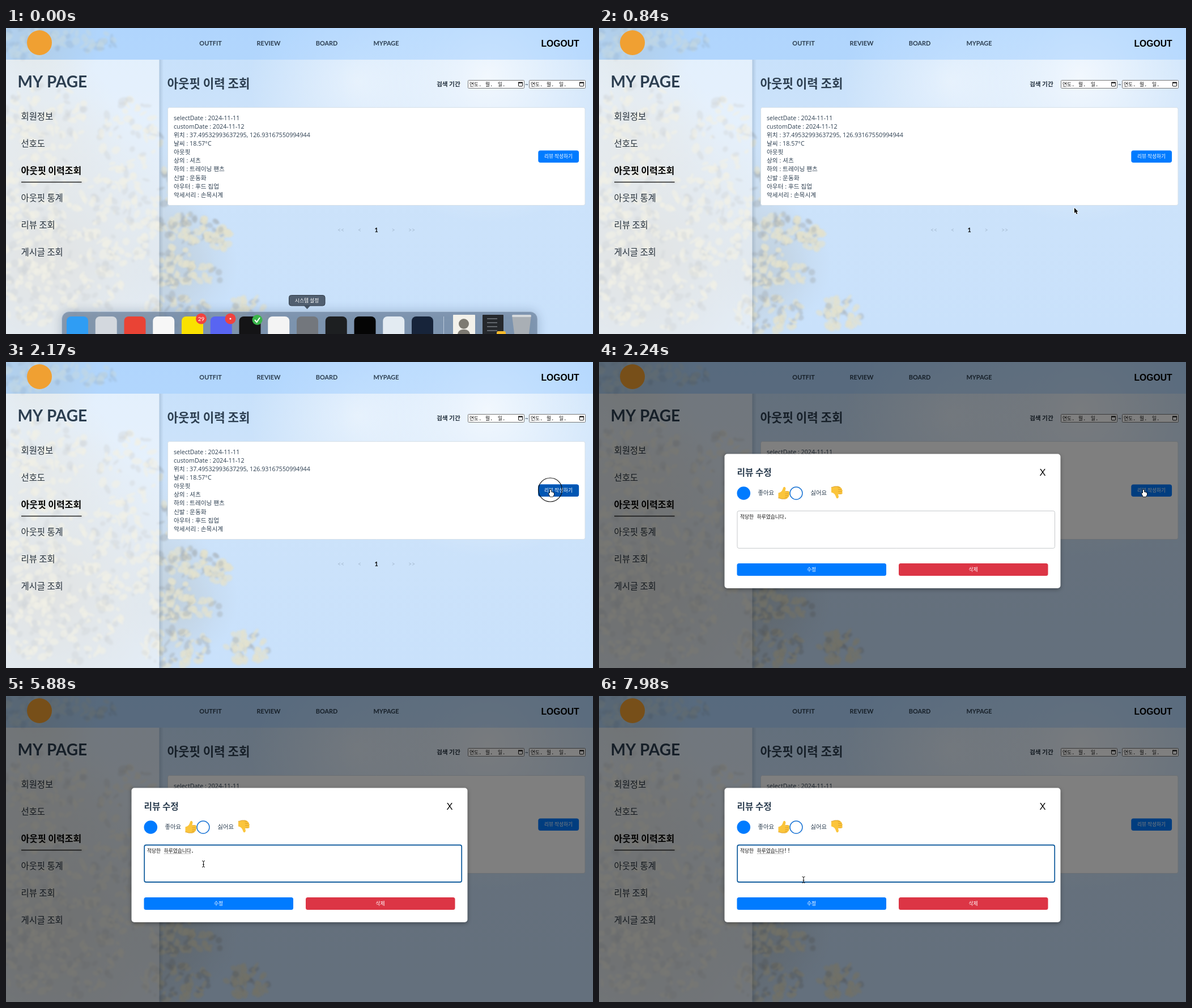
Write an HTML page with a canvas that moves like this. It is 1036 px wide and 541 px high and loops after 8 s.

```html
<!DOCTYPE html>
<html lang="ko">
<head>
<meta charset="utf-8">
<title>My page</title>
<style>
html, body { margin: 0; width: 100%; height: 100%; overflow: hidden; }
canvas { display: block; }
</style>
</head>
<body>
<canvas id="stage" width="1036" height="541"></canvas>
<script>
const W = 1036, H = 541, LOOP = 8000, STEP = 70;
const SANS = 'Lato, "Noto Sans CJK KR", "Noto Sans CJK", sans-serif';
const BODY = '"Open Sans", "Noto Sans CJK KR", "Noto Sans CJK", sans-serif';
const KOREAN = '"Noto Sans CJK KR", "Noto Sans CJK", sans-serif';
const MONO = '"DejaVu Sans Mono", monospace';
const ARIAL = '"Liberation Sans", sans-serif';
const INK = '#2c3e50', BLUE = '#007bff';

const screen = document.getElementById('stage').getContext('2d');
let ctx = screen;

function box(x, y, w, h, r, fill, stroke, line = 1) {
  ctx.beginPath();
  ctx.roundRect(x, y, w, h, r);
  paint(fill, stroke, line);
}

function disc(x, y, r, fill, stroke, line = 1) {
  ctx.beginPath();
  ctx.arc(x, y, r, 0, 7);
  paint(fill, stroke, line);
}

function shape(path, fill, stroke, line = 1) {
  const p = new Path2D(path);
  if (stroke) { ctx.strokeStyle = stroke; ctx.lineWidth = line; ctx.stroke(p); }
  if (fill) { ctx.fillStyle = fill; ctx.fill(p); }
}

function paint(fill, stroke, line) {
  if (fill) { ctx.fillStyle = fill; ctx.fill(); }
  if (stroke) { ctx.strokeStyle = stroke; ctx.lineWidth = line; ctx.stroke(); }
}

function text(s, x, y, size, color = INK, weight = 400, family = SANS, align = 'left') {
  ctx.font = `${weight} ${size}px ${family}`;
  ctx.fillStyle = color;
  ctx.textAlign = align;
  ctx.fillText(s, x, y);
}

function at(x, y, draw) {
  ctx.save();
  ctx.translate(x, y);
  draw();
  ctx.restore();
}

function shadowed(color, blur, dy, draw) {
  ctx.save();
  ctx.shadowColor = color;
  ctx.shadowBlur = blur;
  ctx.shadowOffsetY = dy;
  draw();
  ctx.restore();
}

function glow(x, y, r, rgb, alpha) {
  const g = ctx.createRadialGradient(x, y, 0, x, y, r);
  g.addColorStop(0, `rgba(${rgb},${alpha})`);
  g.addColorStop(1, `rgba(${rgb},0)`);
  ctx.fillStyle = g;
  ctx.fillRect(0, 0, W, H);
}

// Soft sky with blurred clumps of blossom
function drawSky() {
  let seed = 11;
  const rnd = () => (seed = (seed * 16807) % 2147483647) / 2147483647;
  const sky = ctx.createLinearGradient(0, 0, 0, H);
  sky.addColorStop(0, '#c6e0fb');
  sky.addColorStop(0.35, '#cde3fa');
  sky.addColorStop(1, '#c9e1fb');
  ctx.fillStyle = sky;
  ctx.fillRect(0, 0, W, H);
  glow(850, 85, 260, '255,255,255', 0.75);
  glow(620, 95, 190, '244,249,254', 0.65);
  glow(70, 410, 300, '196,199,197', 1);
  glow(60, 190, 150, '205,208,204', 0.7);
  glow(50, 15, 120, '200,202,190', 0.7);
  glow(300, 420, 110, '188,202,212', 0.6);

  const clumps = [
    [70, 160, 75, 60, 90], [60, 290, 80, 75, 130], [90, 440, 120, 95, 220], [205, 330, 70, 90, 130],
    [220, 190, 55, 65, 60], [35, 25, 45, 28, 70], [130, 22, 65, 18, 40], [325, 355, 55, 26, 70],
    [375, 372, 28, 20, 36], [295, 425, 42, 38, 70], [360, 435, 30, 18, 14], [300, 505, 60, 35, 75],
    [425, 505, 38, 30, 50], [290, 270, 18, 50, 18]
  ];
  ctx.filter = 'blur(1.5px)';
  for (const [cx, cy, rx, ry, count] of clumps) {
    for (let i = 0; i < count; i++) {
      const angle = rnd() * 6.28, d = Math.sqrt(rnd());
      ctx.beginPath();
      ctx.ellipse(cx + Math.cos(angle) * d * rx, cy + Math.sin(angle) * d * ry,
        3 + rnd() * 7, 2 + rnd() * 5, rnd() * 3, 0, 7);
      ctx.fillStyle = rnd() < 0.65 ? 'rgba(228,226,206,.65)' : 'rgba(166,176,182,.45)';
      ctx.fill();
    }
  }
  ctx.filter = 'none';
}

function dateField(x) {
  box(x + 0.5, 92.5, 99, 14, 1, '#fff', '#777');
  [['연도', 3, 19], ['월', 31, 39], ['일', 53, 61]].forEach(([s, left, dot]) => {
    text(s, x + left, 102.5, 8.7, '#111', 400, KOREAN);
    text('.', x + dot, 102.5, 9, '#111', 400, MONO);
  });
  box(x + 89.5, 96.5, 7, 6.5, 1, null, '#111');
  box(x + 89, 95.5, 8, 2.2, 0, '#111');
}

function reviewButton(color) {
  box(939.3, 216.4, 71.8, 21.6, 4, color);
  text('리뷰 작성하기', 975, 230, 8.7, '#fff', 400, KOREAN, 'center');
}

function drawPage() {
  drawSky();
  ctx.fillStyle = 'rgba(150,200,255,.45)';
  ctx.fillRect(0, 0, W, 56);
  ctx.fillStyle = 'rgba(255,255,255,.5)';
  ctx.fillRect(0, 56, 270.5, H);
  const edge = ctx.createLinearGradient(270, 0, 278, 0);
  edge.addColorStop(0, 'rgba(70,95,120,.22)');
  edge.addColorStop(1, 'rgba(70,95,120,0)');
  ctx.fillStyle = edge;
  ctx.fillRect(270.5, 56, 8, H);

  disc(59, 26, 22, '#f0a032');
  [['OUTFIT', 361], ['REVIEW', 463.5], ['BOARD', 566], ['MYPAGE', 671]]
    .forEach(([s, x]) => text(s, x, 31, 10.9, INK, 700, SANS, 'center'));
  text('LOGOUT', 944.5, 33, 15.7, '#000', 700, ARIAL);

  text('MY PAGE', 20.5, 104.5, 28, INK, 700);
  ['회원정보', '선호도', '아웃핏 이력조회', '아웃핏 통계', '리뷰 조회', '게시글 조회'].forEach((s, i) => {
    const active = i === 2;
    text(s, 26.5, 161.5 + 48.1 * i, active ? 16 : 15.4, active ? '#000' : '#26313c', active ? 700 : 400, KOREAN);
  });
  box(27, 271.8, 106.5, 1.4, 0, '#222');

  text('아웃핏 이력 조회', 284.5, 106, 21.2, INK, 700, KOREAN);
  text('검색 기간', 760, 103, 10.7, '#1f2d3a', 700, KOREAN);
  dateField(815);
  text('~', 919, 103, 10, INK, 400, SANS, 'center');
  dateField(923);

  box(285.5, 140.5, 736.5, 173, 3, '#fff', '#d5e0e9');
  [
    'selectDate : 2024-11-11', 'customDate : 2024-11-12',
    '위치 : 37.49532993637295, 126.93167550994944', '날씨 : 18.57°C', '아웃핏', '상의 : 셔츠',
    '하의 : 트레이닝 팬츠', '신발 : 운동화', '아우터 : 후드 집업', '악세서리 : 손목시계'
  ].forEach((s, i) => text(s, 296, 162.8 + 15.1 * i, 10.7, INK, 400, BODY));
  reviewButton(BLUE);

  [['<<', 591], ['<', 624], ['>', 683.5], ['>>', 716]]
    .forEach(([s, x]) => text(s, x, 361, 10.5, '#a5bacf', 400, SANS, 'center'));
  text('1', 653.5, 361, 10.7, '#000', 700, SANS, 'center');
}

function drawDock(dy, tooltip) {
  at(0, dy, () => {
    shadowed('rgba(60,85,115,.4)', 18, 0, () =>
      box(98.5, 501.5, 839.5, 70, 13, 'rgba(112,133,160,.72)', 'rgba(190,208,228,.6)'));
    ['#2f9df4', '#d3d8de', '#ea4335', '#f7f7f7', '#fae100', '#5865f2', '#141416', '#f4f4f4',
      '#73777d', '#1d1f21', '#050505', '#e3ebf2', '#17243a']
      .forEach((color, i) => box(107 + 50.75 * i, 510, 38, 38, 8, color));
    box(772, 510, 1, 34, 0, 'rgba(225,235,245,.6)');
    box(789, 507, 39, 50, 1, '#f3f1ea');
    disc(808, 523, 9, '#7d7a72');
    box(797, 533, 22, 20, 9, '#7d7a72');
    box(841, 507, 37, 50, 1, '#25282c');
    for (let i = 0; i < 4; i++) box(849, 513 + 7 * i, 18, 2, 0, '#62676d');
    box(866, 536, 16, 12, 3, '#f5b92b');
    shape('M893 508H927L922 548H898Z', '#a9afb5');
    box(893, 507, 34, 4, 2, '#d5d9dc');
    disc(344.5, 514, 9.5, '#f0433f');
    text('29', 344.5, 517.7, 10, '#fff', 400, SANS, 'center');
    disc(396, 514, 9.5, '#f0433f');
    disc(396, 514, 1.5, '#fff');
    disc(443.5, 516, 9, '#39b54a');
    shape('M439 516L442.5 520L448 512', null, '#fff', 2);
  });
  if (!tooltip) return;
  box(499.5, 472.5, 63.5, 18.5, 4, '#515f70', '#303b48');
  shape('M526 491H537L531.5 497Z', '#465465');
  text('시스템 설정', 531, 485, 8.8, '#fff', 400, KOREAN, 'center');
}

function thumb(x, y, direction) {
  at(x, y, () => {
    ctx.scale(1, direction);
    shape('M-10 0Q-5 -1 -3 -5L-1 -10Q2 -12 3 -8L2 -3H8Q11 -2 9 1Q11 3 8.5 5Q9 8 6.5 8Q6 11 3 10.5H-4Q-8 9 -10 9Z', '#fbc53c');
    shape('M2.5 -2.5H8M2 1.5H9M2 5H8.5M1.5 8.2H6.5M-10 9Q-8 9 -4 10.5H3', null, '#d99a2a', 0.9);
  });
}

function drawModal(t) {
  const focused = t >= 3290, editing = t >= 6580 && t < 7280;
  ctx.fillStyle = 'rgba(0,0,0,.5)';
  ctx.fillRect(0, 0, W, H);
  shadowed('rgba(0,0,0,.35)', 7, 2, () => box(221.5, 162.5, 593, 237.5, 5, '#fff'));

  text('리뷰 수정', 243.5, 200.5, 15.7, INK, 700, KOREAN);
  text('X', 783, 200.5, 16.5, '#000', 400, ARIAL, 'center');
  disc(255.3, 232, 11.8, BLUE);
  disc(348, 232, 11, '#fff', '#1b74d4', 1.5);
  text('좋아요', 280.5, 235.3, 10.4, INK, 400, KOREAN);
  text('싫어요', 373.5, 235.3, 10.4, INK, 400, KOREAN);
  thumb(326.5, 231.5, 1);
  thumb(420, 230.5, -1);

  if (focused) box(244.2, 263.5, 560, 65.5, 3, '#fff', '#155f9f', 1.8);
  else box(244, 263.3, 560.5, 66, 3, '#fff', '#c6c9cc');
  text('적당한', 249, 277, 8.7, '#111', 400, KOREAN);
  text('하루였습니다', 278.7, 277, 8.7, '#111', 400, KOREAN);
  const ending = t < 6580 ? '.' : t < 7140 ? '' : t < 7280 ? '!' : '!!';
  text(ending, 326, 277, 10, '#111', 400, MONO);
  if (focused && !editing) {
    ctx.setLineDash([1.3, 1.2]);
    shape('M279 278.8H326', null, '#777', 1);
    ctx.setLineDash([]);
  }
  if (caretVisible(t)) box(326 + 6 * ending.length, 268, 1, 12, 0, '#111');

  box(243.5, 356, 263.5, 22, 3.5, BLUE);
  box(529, 356, 263.5, 22, 3.5, '#dc3545');
  text('수정', 375, 370, 8.8, '#fff', 400, KOREAN, 'center');
  text('삭제', 660.5, 370, 8.8, '#fff', 400, KOREAN, 'center');
}

function caretVisible(t) {
  if (t < 3290) return false;
  if (t < 6580) return Math.floor((t - 3255) / 525) % 2 === 0;
  return t < 6930 || (t >= 7140 && t < 7770);
}

const cursorPath = [
  [70, 556, 520], [420, 727, 375], [560, 727, 375], [840, 839, 318], [980, 839, 318], [1500, 976, 236],
  [1680, 967, 217], [1820, 961, 226], [2310, 961, 226], [2730, 348.5, 297], [7630, 348.5, 297], [7980, 361, 325]
];

function cursorAt(t) {
  const next = cursorPath.findIndex(key => key[0] > t);
  if (next < 0) return cursorPath.at(-1).slice(1);
  const [t0, x0, y0] = cursorPath[next - 1], [t1, x1, y1] = cursorPath[next];
  const p = (t - t0) / (t1 - t0), e = p * p * (3 - 2 * p);
  return [x0 + (x1 - x0) * e, y0 + (y1 - y0) * e];
}

function drawCursor(t) {
  if (t < 70 || (t >= 6580 && t < 7700)) return;
  const [x, y] = cursorAt(t);
  const within = (l, top, r, b) => x > l && x < r && y > top && y < b;
  at(x, y, () => {
    if (t >= 2380 && within(244, 263, 804, 329)) {
      shape('M-2.5 -5.5Q0 -5.5 0 -4V4Q0 5.5 -2.5 5.5M2.5 -5.5Q0 -5.5 0 -4M0 4Q0 5.5 2.5 5.5M-1.5 1H1.5', null, '#111', 1);
    } else if (t < 2380 && within(939, 216, 1011, 238)) {
      shape('M-1 0Q.5 -1 1 1V4Q5 4 6 6V9L4 12H-.5L-3 7Q-3.5 5 -1 6Z', '#fff', '#111', 1.6);
    } else {
      shape('M0 0V9.2L2.1 7.3L3.7 11L5.4 10.2L3.8 6.7H6.6Z', '#000', '#fff', 1.4);
    }
  });
}

const page = document.createElement('canvas');
page.width = W;
page.height = H;
ctx = page.getContext('2d');
drawPage();
ctx = screen;

function frame(now) {
  const t = Math.floor((now % LOOP) / STEP) * STEP;
  ctx.drawImage(page, 0, 0);
  if (t < 420) drawDock(45 * t / 420, t < 70);
  if (t >= 1960 && t < 2240) {
    reviewButton('#0056b3');
    disc(960.5, 226, 21, null, '#111', 1.2);
  }
  if (t >= 2240) drawModal(t);
  if (t >= 3290 && t < 3360) disc(348.5, 297, 21, null, '#111', 1.2);
  drawCursor(t);
  requestAnimationFrame(frame);
}
requestAnimationFrame(frame);
</script>
</body>
</html>
```
